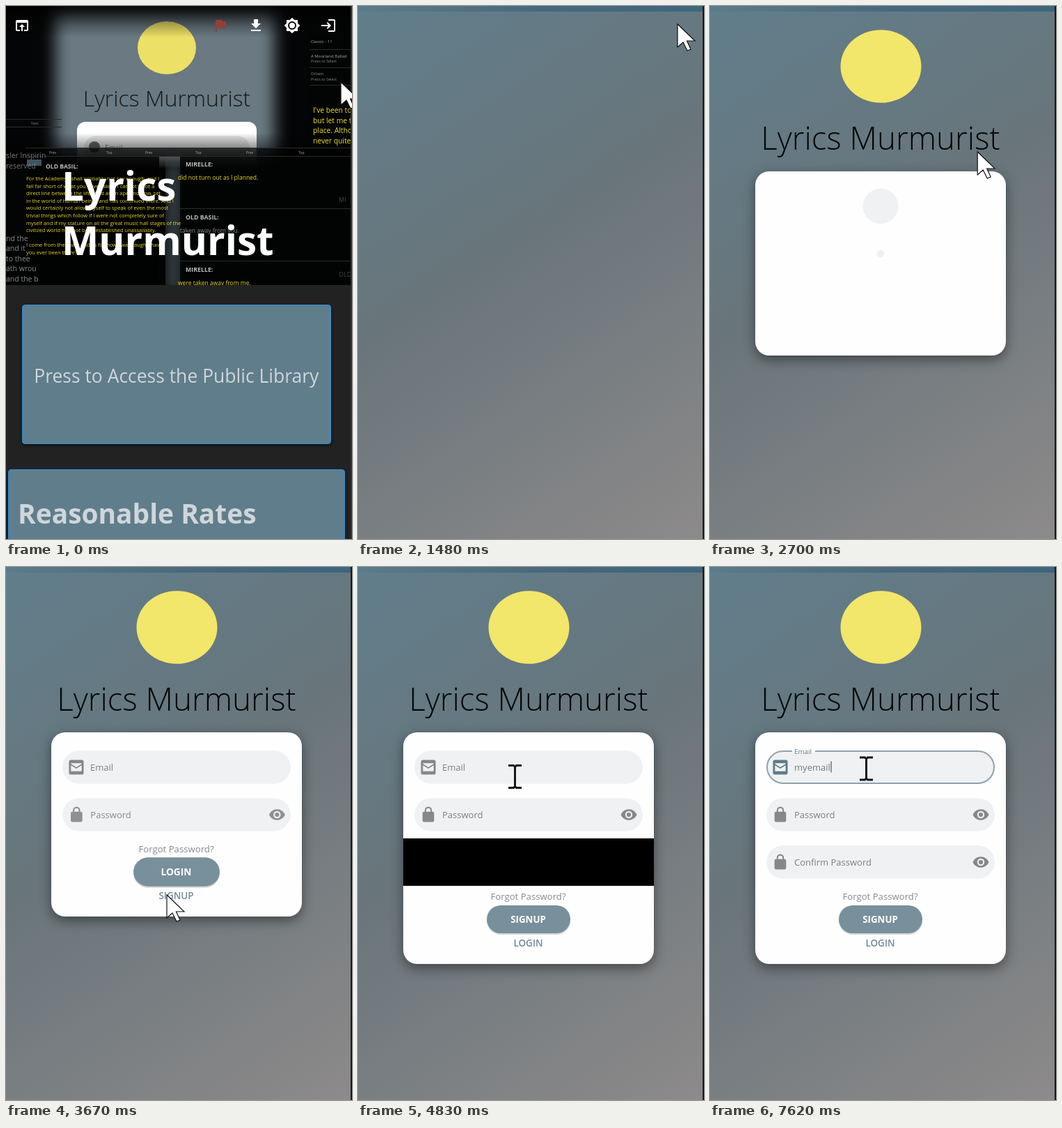
Write an HTML page that moves like this. It is 497 px wide and 764 px high and loops after 8 s.

```html
<!DOCTYPE html>
<html lang="en">
<head>
<meta charset="utf-8">
<title>Login form</title>
<style>
  html, body { margin: 0; width: 100%; height: 100%; overflow: hidden; background: #222; }
  #stage { position: relative; width: 497px; height: 764px; overflow: hidden; perspective: 1160px; perspective-origin: 245px 368px; }
  svg { display: block; font-family: "Open Sans", "Noto Sans", sans-serif; }
  .layer { position: absolute; left: 0; top: 0; }
  #login { width: 495px; height: 764px; background: linear-gradient(147deg, #607e8b, #69757b 45%, #8d8a8a); }
  #login::before { content: ""; position: absolute; width: 100%; height: 8px; background: linear-gradient(90deg, #5c7b8a, #48687c 55%, #3c677e); }
  #edge { left: 495px; width: 2px; height: 764px; background: #191919; }
  #card { position: absolute; left: 65px; top: 236.5px; width: 360px; overflow: hidden; border-radius: 20px; background: #fefefe; box-shadow: 0 6px 18px rgba(0, 0, 0, .45); }
</style>
</head>
<body>
<div id="stage">
  <svg id="home" class="layer" width="497" height="764"></svg>
  <div id="login" class="layer"><svg id="header" class="layer" width="495" height="260"></svg></div>
  <div id="edge" class="layer"></div>
  <div id="card"><svg id="form" width="360" height="332" viewBox="65 236.5 360 332"></svg></div>
  <svg id="pointer" class="layer" width="497" height="764"></svg>
</div>
<script>
const LOOP = 8000;
const NAME = ['Lyrics', 'Murmurist'];
const $ = id => document.getElementById(id);

const clamp = v => Math.min(1, Math.max(0, v));
const span = (t, from, to) => clamp((t - from) / (to - from));
const mix = (a, b, p) => a + (b - a) * p;
const easeOut = p => 1 - (1 - p) ** 3;
const smooth = p => p * p * (3 - 2 * p);
const backOut = p => 1 + 2.70158 * (p - 1) ** 3 + 1.70158 * (p - 1) ** 2;

const text = (x, y, size, fill, str, more = '') =>
  `<text x="${x}" y="${y}" font-size="${size}" fill="${fill}" ${more}>${str}</text>`;
const rect = (x, y, w, h, fill, more = '') =>
  `<rect x="${x}" y="${y}" width="${w}" height="${h}" fill="${fill}" ${more}/>`;
const lines = (x, y, step, size, fill, rows) =>
  rows.map((row, i) => text(x, y + i * step, size, fill, row)).join('');
const icon = (name, cx, cy, size, fill) =>
  `<path d="${ICONS[name]}" fill="${fill}" fill-rule="evenodd" transform="translate(${cx - size / 2} ${cy - size / 2}) scale(${size / 24})"/>`;
const MIDDLE = 'text-anchor="middle"', BOLD = 'font-weight="700"';

const ICONS = {
  open: 'M19 4H5c-1.1 0-2 .9-2 2v12c0 1.1.9 2 2 2h4v-2H5V8h14v10h-4v2h4c1.1 0 2-.9 2-2V6c0-1.1-.9-2-2-2zm-7 6l-4 4h3v6h2v-6h3z',
  flag: 'M14.4 6L14 4H5v17h2v-7h5.6l.4 2h7V6z',
  download: 'M5 20h14v-2H5zM19 9h-4V3H9v6H5l7 7z',
  sun: 'M20 15.3L23.3 12 20 8.7V4h-4.7L12 .7 8.7 4H4v4.7L.7 12 4 15.3V20h4.7l3.3 3.3 3.3-3.3H20zM12 18a6 6 0 1 1 0-12 6 6 0 0 1 0 12zM12 8a4 4 0 1 0 0 8 4 4 0 0 0 0-8z',
  enter: 'M11 7L9.6 8.4l2.6 2.6H2v2h10.2l-2.6 2.6L11 17l5-5zm9 12h-8v2h8c1.1 0 2-.9 2-2V5c0-1.1-.9-2-2-2h-8v2h8z',
  mail: 'M4 1h16q3 0 3 3v16q0 3-3 3H4q-3 0-3-3V4q0-3 3-3zM4 6v12h16V6zM4 7v2.2l8 5 8-5V7l-8 5z',
  lock: 'M18 8h-1V6A5 5 0 0 0 7 6v2H6c-1.1 0-2 .9-2 2v10c0 1.1.9 2 2 2h12c1.1 0 2-.9 2-2V10c0-1.1-.9-2-2-2zM9 6a3 3 0 0 1 6 0v2H9z',
  eye: 'M12 4.5C7 4.5 2.7 7.6 1 12c1.7 4.4 6 7.5 11 7.5s9.3-3.1 11-7.5c-1.7-4.4-6-7.5-11-7.5zM12 17a5 5 0 1 1 0-10 5 5 0 0 1 0 10zm0-8a3 3 0 1 0 0 6 3 3 0 0 0 0-6z',
};

function drawHome() {
  const speech = ['For the Academy I shall probably not say enough, and I', 'fall far short of what you have asked. I cannot trace a',
    'direct line between the life I had as an ape and now, set', 'in the world of human beings and has continued there. And I',
    'would certainly not allow myself to speak of even the most', 'trivial things which follow if I were not completely sure of',
    'myself and if my stature on all the great music hall stages of the', 'civilized world had not been established unassailably.', '',
    'I come from the coast and as for how I was caught, have', 'you ever been there?'];
  const bar = [['open', 23], ['flag', 308, '#963d35'], ['download', 359], ['sun', 411], ['enter', 463]];
  $('home').innerHTML = `
    <defs>
      <filter id="soft" x="-30%" y="-30%" width="160%" height="160%"><feGaussianBlur stdDeviation="11"/></filter>
      <linearGradient id="shade" x2="0" y2="1"><stop offset="0" stop-opacity="0"/><stop offset="1"/></linearGradient>
      <linearGradient id="top" x2="0" y2="1"><stop offset="0" stop-opacity=".7"/><stop offset="1" stop-opacity="0"/></linearGradient>
      <clipPath id="hero">${rect(0, 0, 495, 400, '#000')}</clipPath>
      <filter id="drop"><feDropShadow dx="0" dy="2" stdDeviation="2" flood-opacity=".6"/></filter>
    </defs>
    ${rect(0, 0, 497, 764, '#222')}
    <g clip-path="url(#hero)">
      ${rect(0, 0, 495, 400, '#040506')}
      ${rect(71, 9, 315, 240, '#6a7982', 'filter="url(#soft)"')}
      <ellipse cx="231" cy="60" rx="42" ry="38" fill="#ede066"/>
      ${text(231, 144, 32, '#15191b', NAME.join(' '), MIDDLE + ' font-weight="300"')}
      ${rect(102, 166, 258, 80, '#fff', 'rx="12"')}
      ${rect(112, 186, 238, 40, '#e6e8ea', 'rx="18"')}
      <circle cx="127" cy="202" r="8" fill="#666"/>${text(142, 207, 10, '#777', 'Email')}
      ${rect(0, 0, 495, 45, 'url(#top)')}
      ${rect(0, 182, 495, 52, 'url(#shade)')}
      ${rect(28, 203, 467, 13, '#020202', 'opacity=".7"')}
      ${rect(0, 234, 495, 166, '#030404')}
      ${rect(234, 225, 14, 190, '#5a676f', 'filter="url(#soft)"')}
      ${rect(28, 216, 192, 184, '#020202', 'opacity=".85"')}
      ${rect(250, 216, 245, 184, '#030404', 'opacity=".85"')}
      ${rect(432, 40, 63, 165, '#030404')}
      ${[[0, 162, 80], [0, 173, 80], [28, 203, 467], [28, 215, 467], [246, 290, 249], [246, 365, 249], [436, 62, 60], [436, 88, 60], [436, 113, 60]]
        .map(([x, y, w]) => rect(x, y, w, 1, '#272b2d')).join('')}
      ${[62, 144, 200, 272, 345, 420].map((x, i) => text(x, 212, 5, '#aaa', i % 2 ? 'Top' : 'Prev')).join('')}
      ${rect(30, 220, 21, 9, '#3f5560')}
      ${text(36, 170, 5, '#777', 'Next')}
      ${lines(438, 53, 21, 6, '#aaa', ['Classic - 11', 'A Moorland Ballad'])}
      ${lines(438, 81, 26, 5.5, '#888', ['Press to Select', 'Press to Select'])}
      ${text(438, 99, 6, '#888', 'Orlwin')}
      ${lines(441, 153, 14.6, 10.3, '#efe02c', ["I've been to", 'but let me t', 'place. Altho', 'never quite'])}
      ${lines(0, 218, 15, 10.5, '#777', ['sler  Inspirin', 'reserved'])}
      ${lines(0, 337, 14.4, 10.5, '#8a8a8a', ['nd the', 'and it', 'to thee', 'ath wrou', 'and the b'])}
      ${text(57, 233, 8.6, '#bbb', 'OLD BASIL:', BOLD)}
      ${lines(29, 250, 10.6, 7.5, '#e8d921', speech)}
      ${text(258, 230, 8.8, '#bbb', 'MIRELLE:', BOLD)}${text(247, 249, 8.5, '#e8d921', 'did not turn out as I planned.')}
      ${text(258, 306, 8.8, '#bbb', 'OLD BASIL:', BOLD)}${text(250, 325, 8.5, '#8a8a8a', 'taken away from you.')}
      ${text(258, 381, 8.8, '#bbb', 'MIRELLE:', BOLD)}${text(247, 400, 8.5, '#e8d921', 'were taken away from me.')}
      ${lines(478, 281, 107, 9, '#444', ['MI', 'OLD'])}
    </g>
    ${text(80, 279, 56.6, '#fff', NAME[0], BOLD)}${text(80, 357, 56.6, '#fff', NAME[1], BOLD)}
    ${bar.map(([name, x, fill = '#fff']) => icon(name, x, 28, 24, fill)).join('')}
    <g filter="url(#drop)" stroke="#2490e6">
      ${rect(23.5, 428.5, 443, 199, '#607d8b', 'rx="4"')}${rect(3.5, 664.5, 483, 200, '#607d8b', 'rx="4"')}
    </g>
    ${text(244.8, 540, 26.5, '#cfd6da', 'Press to Access the Public Library', MIDDLE)}
    ${text(17, 742, 38.9, '#cfd6da', 'Reasonable Rates', BOLD)}`;
}

const ruler = document.createElement('canvas').getContext('2d');
function textWidth(str) {
  ruler.font = '13px "Open Sans", "Noto Sans", sans-serif';
  return ruler.measureText(str).width;
}

function field(y, label, name, p, { fill = '#85888a', extra = '' } = {}) {
  if (p <= 0) return '';
  const pop = backOut(clamp(p / .2));
  const w = mix(48, 328, easeOut(span(p, .2, 1)));
  const left = 245 - w / 2, show = span(p, .3, .95);
  const box = rect(left, y - 23.75, w, 47.5, '#f0f1f3', 'rx="23.75"');
  return `<g transform="translate(245 ${y}) scale(${pop}) translate(-245 ${-y})">${box}${extra}
    <g opacity="${show}">${icon(name, left + 20, y, name === 'lock' ? 25 : 23, fill)}
    ${label && w > 150 ? text(left + 40, y + 4.7, 13, '#7b7f82', label) : ''}
    ${name === 'lock' ? icon('eye', left + 308, y, 25, fill) : ''}</g></g>`;
}

// The email field floats its label on focus and then receives typed text.
function emailField(t, p) {
  if (t < 5560) return field(286.5, 'Email', 'mail', p);
  const up = smooth(span(t, 5560, 5750));
  const typed = t < 6380 ? '' : t < 6450 ? 'myem' : t < 6590 ? 'myemai' : 'myemail';
  const caretOff = (t >= 6110 && t < 6380) || (t >= 7110 && t < 7620);
  const border = rect(82, 263.5, 326, 46, 'none', `rx="23" stroke="#8fa2ac" stroke-width="${mix(1.4, 2, up)}"`);
  const extra = border + rect(118, 261.5, 33 * up, 4, '#f9fafa')
    + text(121, mix(291.2, 267, up), mix(13, 9.8, up), '#607d8b', 'Email')
    + text(121, 291.2, 13, '#74787b', typed)
    + (caretOff ? '' : rect(121.5 + textWidth(typed), 278, 1.5, 16, '#607d8b'));
  return field(286.5, '', 'mail', 1, { fill: '#5f7b89', extra });
}

// Caption that folds flat and opens again with its new word.
function flipText(y, q, size, fill, before, after, weight) {
  return `<g transform="translate(244.5 ${y}) scale(1 ${Math.abs(1 - 2 * q)})">
    ${text(0, 4.8, size, fill, q < .5 ? before : after, `${MIDDLE} font-weight="${weight}"`)}</g>`;
}

function drawForm(t) {
  const p = span(t, 2540, 3790);
  const grow = 68 * smooth(span(t, 4090, 4600));
  const slide = easeOut(span(t, 4850, 5200));
  const swap = span(t, 4090, 4700);
  const late = span(p, .4, 1);
  const pop = late > 0 ? backOut(late) : 0;
  const fade = span(p, .4, .9);
  const confirm = slide > 0 ? `<g transform="translate(${-360 * (1 - slide)} 0)">
    ${rect(65, 388, 360, 69, '#fefefe')}${field(422.5, 'Confirm Password', 'lock', 1)}</g>` : '';
  $('form').innerHTML = emailField(t, p / .85)
    + field(354.5, 'Password', 'lock', span(p, .12, 1))
    + (grow > 0 && slide < 1 ? rect(65, 388.5, 360, grow, '#000') : '') + confirm
    + `<g transform="translate(0 ${grow})">
      ${text(244.5, 408, 13.2, '#868b8f', 'Forgot Password?', `${MIDDLE} opacity="${fade}"`)}
      <g transform="translate(245 436.5) scale(${pop}) translate(-245 -436.5)">
        ${rect(185, 418.5, 120, 40, '#000', 'rx="20" opacity=".16"')}${rect(185, 416.5, 120, 40, '#78909c', 'rx="20"')}
        ${flipText(436.7, swap, 13.3, '#fff', 'LOGIN', 'SIGNUP', 700)}
      </g>
      <g opacity="${fade}">${flipText(470.7, swap, 13.5, '#708a97', 'SIGNUP', 'LOGIN', 600)}</g></g>`;
  $('card').style.height = 264 + grow + 'px';
}

function drawHeader(t) {
  const p = span(t, 2030, 2430) ** 1.6;
  $('header').innerHTML = `<g opacity="${p}" transform="translate(0 ${-31 * (1 - p)})">
    <ellipse cx="245.5" cy="86.5" rx="58" ry="52.3" fill="#f2e66b"/>
    ${text(245, 206, 45.7, '#050606', NAME.join(' '), MIDDLE + ' font-weight="300"')}</g>`;
}

const PATH = [[70, 481, 109], [250, 478, 158], [690, 457, 21], [950, 457, 21], [1080, 461, 28], [1479, 461, 28], [1480, 459, 26],
  [2160, 459, 26], [2840, 365, 256], [3600, 231, 470], [4200, 231, 470], [4830, 225.5, 300.5], [5400, 224.5, 289]];
const SHAPES = {
  arrow: '<path d="M0 0V33L8 26L14 38L19 36L13.5 24H25Z" fill="#fff" stroke="#111" stroke-width="1.2"/>',
  hand: '<path d="M-4 4Q-4 0 0 0Q4 0 4 4V15Q9 13 11 17Q15 15 17 19Q20 18 20 23V33Q19 39 16 46H-3Q-5 40 -14 31Q-18 27 -14 24Q-10 22 -4 30Z" fill="#fff" stroke="#111" stroke-width="1.2"/>',
  beam: '<path d="M-9.5 -16H-2L0 -14L2 -16H9.5M0 -14V14M-9.5 16H-2L0 14L2 16H9.5" fill="none" stroke="#15181a" stroke-width="3"/>',
};
function drawPointer(t) {
  const next = PATH.findIndex(k => k[0] > t);
  const b = PATH[next < 0 ? PATH.length - 1 : next];
  const a = PATH[next < 0 ? PATH.length - 1 : Math.max(0, next - 1)];
  const p = a === b ? 0 : span(t, a[0], b[0]);
  const shape = t < 560 ? 'arrow' : t < 1480 ? 'hand' : t < 3700 ? 'arrow' : t < 4250 ? 'hand' : t < 4480 ? 'arrow' : 'beam';
  $('pointer').innerHTML = `<g transform="translate(${mix(a[1], b[1], p)} ${mix(a[2], b[2], p)})">${SHAPES[shape]}</g>`;
}

function render(t) {
  const open = t >= 1480;
  $('login').style.display = open ? '' : 'none';
  $('edge').style.background = open ? '#191919' : '#333';
  $('card').style.display = t >= 2035 ? '' : 'none';
  if (open) {
    const flip = 1 - (1 - span(t, 2030, 2430)) ** 2;
    $('card').style.transform = flip < 1 ? `rotateX(${-90 * (1 - flip)}deg)` : '';
    drawHeader(t);
    drawForm(t);
  }
  drawPointer(t);
}

drawHome();
const start = performance.now();
(function tick() {
  render((performance.now() - start) % LOOP);
  requestAnimationFrame(tick);
})();
</script>
</body>
</html>
```
